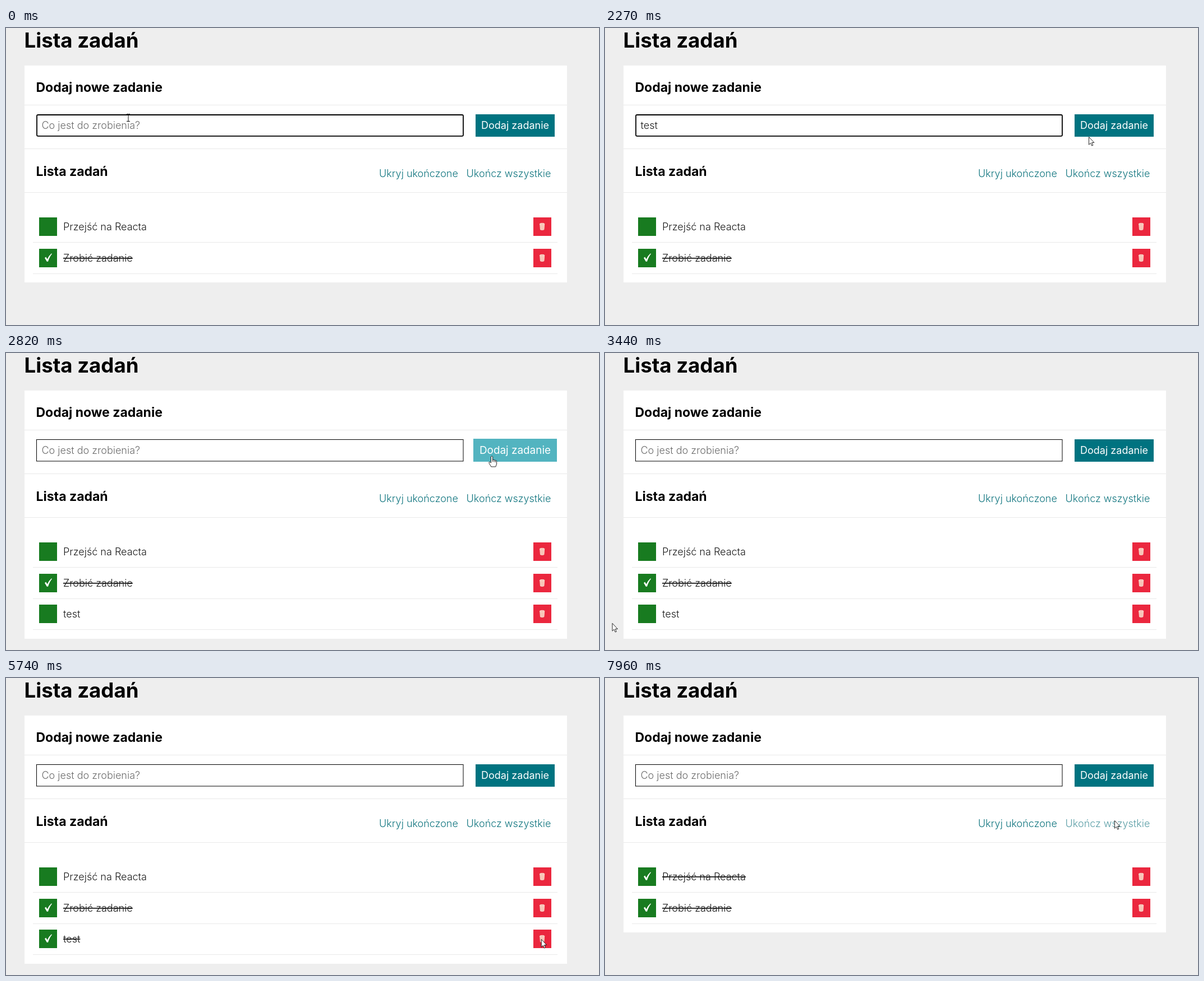
An HTML page that plays this animation: 1057 px wide and 530 px high, repeating every 8 s.

```html
<!DOCTYPE html>
<html lang="pl">
<head>
<meta charset="utf-8">
<title>Lista zadań</title>
<style>
  html, body { margin: 0; width: 100%; height: 100%; overflow: hidden; background: #eee; }
  svg { display: block; width: 100%; height: 100%; }
  rect { shape-rendering: crispEdges; }
  text { font: 300 18px Montserrat, Inter, "Open Sans", sans-serif; font-optical-sizing: none; fill: #1c1c1c; white-space: pre; }
  .mid { text-anchor: middle; }
  .title { font-size: 36.6px; font-weight: 700; fill: #000; }
  .heading { font-size: 23px; font-weight: 700; fill: #000; }
  .link { fill: #10757f; }
  .done { text-decoration: line-through; }
  .rule { stroke: #e9e9e9; shape-rendering: crispEdges; }
  .pointer { fill: #fff; stroke: #111; stroke-width: .9; stroke-linejoin: round; }
  #button text { fill: #fff; font-weight: 400; }
</style>
</head>
<body>
<svg viewBox="0 0 1057 530">
  <defs>
    <g id="bin" fill="#f7bdb0" stroke="#fbdccf">
      <path d="M-3.9 -4.5L-3.2 5.4Q0 6.8 3.2 5.4L3.9 -4.5Z"/>
      <ellipse cy="-4.6" rx="4.3" ry="1.5"/>
      <path d="M-1.2 -2V5M1.2 -2V5" stroke-width=".6"/>
    </g>
  </defs>
  <rect width="1057" height="530" fill="#eee"/>
  <text class="title mid" x="134.5" y="35">Lista zadań</text>
  <rect id="panel" x="33" y="67" width="966.5" fill="#fff"/>
  <path class="rule" d="M33 137.5H999.5M33 215.5H999.5M33 293.5H999.5"/>
  <text class="heading" x="53.5" y="114">Dodaj nowe zadanie</text>
  <text class="heading" x="53.5" y="264">Lista zadań</text>

  <rect id="field" fill="#fff" stroke="#000" style="shape-rendering:auto"/>
  <text id="entry" x="63.5" y="179.5"></text>

  <g id="button">
    <rect id="buttonFill" x="837" y="154" width="141" height="39.5"/>
    <text class="mid" x="907.5" y="179.5">Dodaj zadanie</text>
  </g>

  <text class="link mid" x="735.5" y="266">Ukryj ukończone</text>
  <text class="link mid" id="finishAll" x="896" y="266">Ukończ wszystkie</text>

  <g id="rows"></g>
  <circle id="click" r="13" fill="#ff0" fill-opacity=".47"/>
  <g id="cursor">
    <path id="beam" d="M-3 -6.5H-.8L0 -6L.8 -6.5H3M0 -6V6M-3 6.5H-.8L0 6L.8 6.5H3" fill="none" stroke="#111"/>
    <path id="arrow" class="pointer" d="M.5 .5V14.3L3.6 11.4L5.7 16.2L7.8 15.3L5.7 10.6H9.9Z"/>
    <path id="hand" class="pointer" d="M-1.5 1Q0 -1.2 1.5 1V7Q3 5.3 4 7.2Q5.6 6 6.4 8Q8.4 7.2 8.6 9.4V14L6.8 19H-1.2L-5 12.5Q-5.6 9.6 -3.2 10.6L-1.5 12ZM1.5 7V10M4 7.5V10.5M6.4 8.2V11"/>
  </g>
</svg>
<script>
const DURATION = 8000;
const CLICK_LENGTH = 200;
const ROW_TOP = 338, ROW_STEP = 55.6;
const click = { add: 2620, finish: 4110, remove: 6080, finishAll: 7700 };
const after = time => time + CLICK_LENGTH;

const tasks = [
  { label: 'Przejść na Reacta', doneAt: 7960 },
  { label: 'Zrobić zadanie', doneAt: 0 },
  { label: 'test', addedAt: after(click.add), doneAt: after(click.finish), removedAt: after(click.remove) }
];

const home = { x: 218, y: 160 };
const moves = [
  { from: 1000, to: 1870, x: 862, y: 194 },
  { from: 2270, to: 2550, x: 866, y: 184 },
  { from: 3020, to: 3400, x: 12, y: 482 },
  { from: 3440, to: 3710, x: 89, y: 458 },
  { from: 4440, to: 4910, x: 1004, y: 461 },
  { from: 5120, to: 5880, x: 952, y: 466 },
  { from: 6470, to: 7020, x: 905, y: 273 },
  { from: 7280, to: 7700, x: 908, y: 254 }
];

const $ = id => document.getElementById(id);
const show = (id, visible) => $(id).style.display = visible ? '' : 'none';
const setAttrs = (id, attrs) => {
  for (const name in attrs) $(id).setAttribute(name, attrs[name]);
};
const easeOut = k => 1 - (1 - k) ** 2;

function cursorAt(t) {
  let { x, y } = home;
  for (const move of moves) {
    const k = easeOut(Math.min(1, Math.max(0, (t - move.from) / (move.to - move.from))));
    x += (move.x - x) * k;
    y += (move.y - y) * k;
  }
  return { x, y };
}

$('rows').innerHTML = tasks.map(({ label }, i) => `
  <g id="row${i}" transform="translate(0 ${Math.round(ROW_TOP + i * ROW_STEP)})">
    <rect x="59" width="32" height="32.5" fill="#187b20"/>
    <path id="tick${i}" d="M69 16.2L71.2 14.6L73.6 18.4Q76.6 12 81 8.2L82 9Q77.5 14.5 75 22.8H72.8Z" fill="#fff"/>
    <text id="label${i}" x="102" y="22.5">${label}</text>
    <rect x="940" width="32" height="32.5" fill="#eb273e"/>
    <use href="#bin" x="955.7" y="16.4"/>
    <path class="rule" d="M48 44.5H983"/>
  </g>`).join('');

function render(t) {
  const { x, y } = cursorAt(t);
  const inside = (left, top, right, bottom) => x > left && x < right && y > top && y < bottom;
  const overField = inside(54, 154, 815, 193);
  const overButton = inside(837, 154, 978, 191);
  const overLink = inside(821, 248, 971, 270);

  const focused = t < click.add;
  setAttrs('field', focused
    ? { x: 55, y: 155, width: 760, height: 37.8, rx: 2, 'stroke-width': 1.8 }
    : { x: 54.5, y: 154.5, width: 760.5, height: 38.5, rx: 0, 'stroke-width': 1 });

  // One letter every 153 ms, starting at 80 ms.
  const letters = Math.max(0, Math.floor((t - 80) / 153) + 1);
  const typed = t < after(click.add) ? 'test'.slice(0, letters) : '';
  $('entry').textContent = typed || 'Co jest do zrobienia?';
  $('entry').style.fill = typed ? '' : '#6c6c6c';

  const scale = overButton ? 1.05 : 1;
  setAttrs('button', { transform: `translate(907.5 173.75) scale(${scale}) translate(-907.5 -173.75)` });
  setAttrs('buttonFill', { fill: overButton ? '#53b4c0' : '#007380' });
  $('finishAll').style.fill = overLink ? '#5a9ea6' : '';

  let visibleRows = 0;
  tasks.forEach(({ doneAt, addedAt = 0, removedAt = DURATION }, i) => {
    const present = t >= addedAt && t < removedAt;
    visibleRows += present;
    show('row' + i, present);
    show('tick' + i, t >= doneAt);
    $('label' + i).classList.toggle('done', t >= doneAt);
  });
  setAttrs('panel', { height: 276 + visibleRows * ROW_STEP });

  show('click', Object.values(click).some(time => t >= time && t < after(time)));
  setAttrs('click', { cx: x, cy: y });
  setAttrs('cursor', { transform: `translate(${x} ${y})` });
  show('beam', overField);
  show('hand', overButton);
  show('arrow', !overField && !overButton);
}

const start = performance.now();
function tick() {
  render((performance.now() - start) % DURATION);
  requestAnimationFrame(tick);
}
tick();
</script>
</body>
</html>
```
